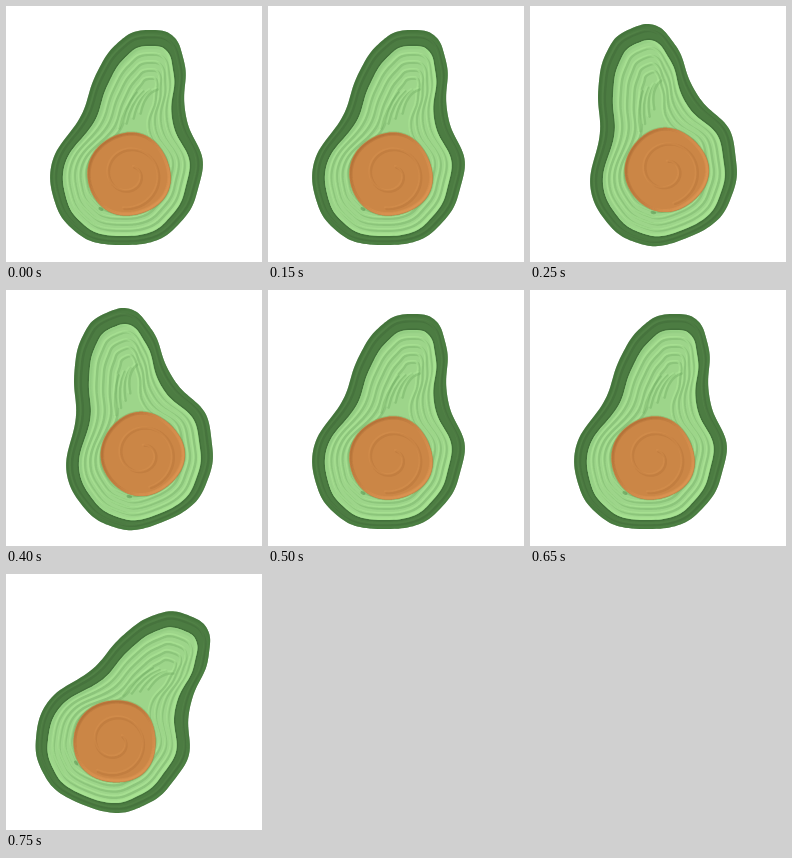
Write an HTML page with a canvas that moves like this. It is 256 by 256 pixels and loops after 1 s.

```html
<!DOCTYPE html>
<html lang="en">
<head>
<meta charset="utf-8">
<title>Rocking avocado</title>
<style>
html, body { margin: 0; width: 100%; height: 100%; overflow: hidden; background: #fff; }
canvas { display: block; width: 256px; height: 256px; }
</style>
</head>
<body>
<canvas id="stage" width="256" height="256"></canvas>
<script>
const ctx = document.getElementById('stage').getContext('2d');
const PIVOT = { x: 118.5, y: 132 };
const PIT = { x: 123, y: 168.5, r: 41.5 };
const STEP = 250;
const TILT = 22 * Math.PI / 180;

// Closed path through point(a) for a full turn
function loop(point) {
  const path = new Path2D();
  for (let a = 0; a < 2 * Math.PI; a += 0.03) path.lineTo(...point(a));
  path.closePath();
  return path;
}

// Leaning pear: narrow head, smooth waist, wide body
function pear(cy, height, width) {
  return loop(a => {
    const c = Math.cos(a), s = Math.sin(a);
    const axis = 124 + 14 * c + 7 * c * c;
    const half = width - 15 * Math.tanh(5 * (c + 0.03)) + 4 * c * c;
    const wobble = 0.5 * Math.sin(9 * a) + 0.4 * Math.sin(14 * a + 1);
    return [
      axis + half * Math.sign(s) * Math.abs(s) ** 0.75 + wobble,
      cy - height * c
    ];
  });
}

const skin = pear(131.5, 107.5, 65.5);
const flesh = pear(135, 95, 52);
const pit = loop(a => {
  const r = PIT.r + 0.6 * Math.sin(4 * a) + 0.5 * Math.sin(3 * a);
  return [PIT.x + r * Math.cos(a), PIT.y + r * Math.sin(a)];
});

function line(path, color, width, shift = 0) {
  ctx.save();
  ctx.translate(shift, shift);
  ctx.strokeStyle = color;
  ctx.lineWidth = width;
  ctx.stroke(path);
  ctx.restore();
}

function groove(path, light, dark) {
  line(path, dark, 2.6, 0.6);
  line(path, light, 2, -1);
}

// Filled shape with soft rims: dark at the upper left, light at the lower right
function slab(path, fill, light, dark, detail) {
  ctx.save();
  ctx.fillStyle = fill;
  ctx.fill(path);
  ctx.clip(path);
  detail();
  for (const w of [5, 3, 1.5]) {
    line(path, dark, w, 0.7);
    line(path, light, w, -1);
  }
  ctx.restore();
}

function skinDetail() {
  groove(pear(132.5, 102, 60), 'rgba(100,150,85,.2)', 'rgba(45,82,40,.2)');
}

// Nested brush marks, then short streaks up the neck
function fleshDetail() {
  for (let k = 1; k < 5; k++) {
    groove(pear(135 + k, 95 - 7 * k, 52 - 6 * k),
      'rgba(178,236,156,.42)', 'rgba(112,172,98,.38)');
  }
  for (let k = 0; k < 4; k++) {
    const x = 113 + 7 * k, y = 122 - 5 * k;
    groove(new Path2D(`M${x} ${y} q4 -20 17 -${36 - 4 * k}`),
      'rgba(178,236,156,.35)', 'rgba(112,172,98,.42)');
  }
  ctx.fillStyle = 'rgba(89,148,80,.55)';
  ctx.beginPath();
  ctx.ellipse(95, 203, 2.8, 1.6, 0.5, 0, 7);
  ctx.fill();
}

function pitDetail() {
  const swirl = new Path2D();
  for (let a = 0; a < 9; a += 0.1) {
    const r = 9 + 2.8 * a;
    swirl.lineTo(PIT.x + r * Math.cos(a - 1), PIT.y + r * Math.sin(a - 1));
  }
  groove(swirl, 'rgba(222,152,86,.25)', 'rgba(158,97,44,.22)');
}

function avocado() {
  ctx.lineCap = ctx.lineJoin = 'round';
  slab(skin, '#4c7c42', 'rgba(85,140,72,.12)', 'rgba(58,100,52,.15)', skinDetail);
  line(flesh, 'rgba(50,92,45,.4)', 3);
  slab(flesh, '#9dd58a', 'rgba(176,236,154,.3)', 'rgba(130,190,115,.18)', fleshDetail);
  line(pit, 'rgba(125,150,80,.4)', 2);
  slab(pit, '#cb8646', 'rgba(230,157,90,.28)', 'rgba(160,98,44,.25)', pitDetail);
}

function draw(now) {
  const beat = Math.floor(now / STEP) % 4;
  ctx.fillStyle = '#fff';
  ctx.fillRect(0, 0, 256, 256);
  ctx.save();
  ctx.translate(PIVOT.x, PIVOT.y);
  ctx.rotate(-TILT * Math.sin(beat * Math.PI / 2));
  ctx.translate(-PIVOT.x, -PIVOT.y);
  avocado();
  ctx.restore();
}

const start = performance.now();
function tick() {
  draw(performance.now() - start);
  requestAnimationFrame(tick);
}
tick();
</script>
</body>
</html>
```
